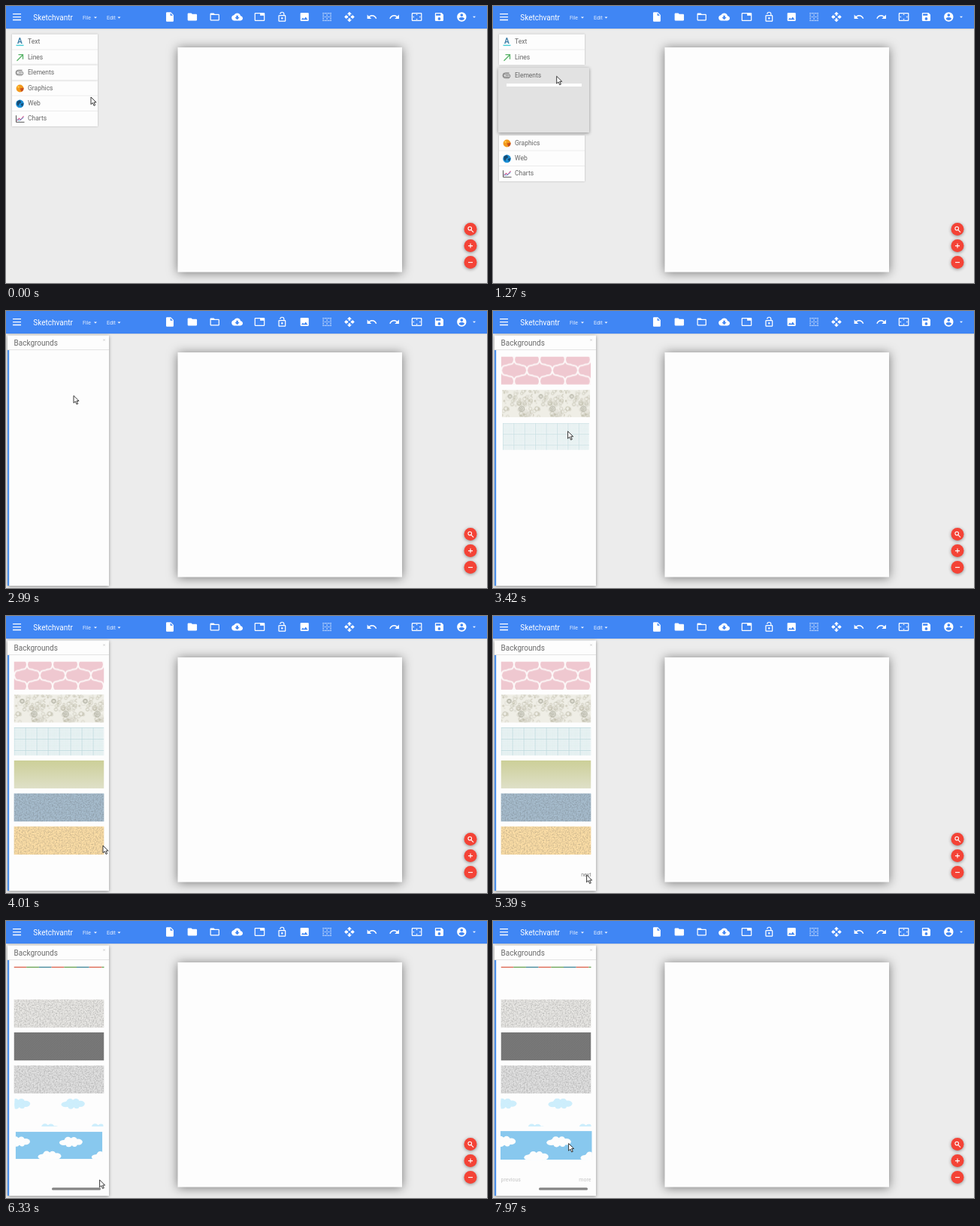
Recreate the animation shown at these times as an HTML page. Size 640 by 368 pixels, loop 8 s.

```html
<!DOCTYPE html>
<html lang="en">
<head>
<meta charset="utf-8">
<title>Backgrounds panel</title>
<style>
html, body { margin: 0; width: 100%; height: 100%; overflow: hidden; background: #ececec; }
svg { display: block; font-family: Roboto, Arial, sans-serif; }
#stage { width: 100vw; height: 100vh; }
.page { filter: drop-shadow(0 1px 7px rgba(0,0,0,.5)); }
.card { filter: drop-shadow(0 .6px .8px rgba(0,0,0,.25)); }
.lift { filter: drop-shadow(0 1px 2px rgba(0,0,0,.4)); }
.row { font-size: 8.5px; fill: #666; }
.foot { font-size: 7px; }
</style>
</head>
<body>
<svg id="stage" viewBox="0 0 640 368">
  <defs>
    <filter id="grain" x="0" y="0" width="1" height="1" color-interpolation-filters="sRGB">
      <feTurbulence type="fractalNoise" baseFrequency=".55" numOctaves="2" seed="4"/>
      <feColorMatrix values="0 0 0 0 .3  0 0 0 0 .3  0 0 0 0 .3  .6 0 0 0 -.22"/>
      <feComposite in2="SourceGraphic" operator="atop" result="n"/>
      <feMerge><feMergeNode in="SourceGraphic"/><feMergeNode in="n"/></feMerge>
    </filter>
    <linearGradient id="olive" x2="0" y2="1">
      <stop stop-color="#cccf98"/><stop offset="1" stop-color="#dfe0c8"/>
    </linearGradient>
    <pattern id="trellis" width="34" height="29" x="34.5" y="4" patternUnits="userSpaceOnUse">
      <rect width="34" height="29" fill="#efc8d0"/>
      <g id="quads" fill="none" stroke="#fdf8f8" stroke-width="2"></g>
    </pattern>
    <pattern id="floral" width="42" height="37.5" patternUnits="userSpaceOnUse">
      <rect width="42" height="37.5" fill="#efeee6"/>
      <g id="petals" fill="none"></g>
    </pattern>
    <pattern id="graph" width="15" height="15" patternUnits="userSpaceOnUse">
      <rect width="15" height="15" fill="#f4f9f9"/>
      <path id="fine" stroke="#d3e6e8" stroke-width=".6"/>
      <path d="M0 .4H15M.4 0V15" stroke="#b9d6da" stroke-width=".8"/>
    </pattern>
    <pattern id="twill" width="3" height="3" patternUnits="userSpaceOnUse">
      <rect width="3" height="3" fill="#797979"/>
      <path d="M0 3L3 0" stroke="#6d6d6d" stroke-width=".8"/>
    </pattern>
    <g id="cloud">
      <ellipse rx="12" ry="5"/><ellipse cx="-10" cy="1" rx="6" ry="3.6"/>
      <ellipse cx="10" rx="6" ry="4.2"/><circle cx="-4" cy="-2" r="5"/>
      <circle cx="4" cy="-2.3" r="4.6"/><circle cx="-3" cy="3" r="4"/><circle cx="5" cy="3" r="3.6"/>
    </g>
  </defs>

  <rect width="640" height="368" fill="#ececec"/>
  <rect class="page" x="228.5" y="55" width="298.5" height="298.5" fill="#fdfdfd"/>
  <rect class="card" width="640" height="30" fill="#4086f4"/>
  <path d="M9 10.7h11M9 14.6h11M9 18.5h11" stroke="#fff" stroke-width="1.3"/>
  <g fill="#fff">
    <text x="36.3" y="18.6" font-size="10">Sketchvantr</text>
    <g font-size="7" opacity=".85"><text x="102" y="17.8">File</text><text x="134" y="17.8">Edit</text></g>
    <path d="M117 14.6h4l-2 2zM148.5 14.6h4l-2 2zM621 13.8h4l-2 2z"/>
    <g id="tools"></g>
  </g>
  <g id="fabs"></g>

  <g id="menu">
    <g id="top" class="card"></g>
    <g id="bottom" class="card"></g>
    <g id="mid" class="card">
      <rect id="midBox" fill="#fdfdfd"/>
      <rect id="midTint" fill="#e2e2e2"/>
      <g id="midRow"></g>
      <svg id="list" x="18" y="103" width="100">
        <rect width="100" height="90" fill="#fdfdfd"/>
        <text class="row" x="11" y="13.5">Backgrounds</text>
      </svg>
    </g>
  </g>

  <g id="panel">
    <rect class="lift" x="2" y="32.5" width="135" height="332.5" fill="#fdfdfd"/>
    <path d="M2 51.5H137" stroke="#ddd" stroke-width=".8"/>
    <rect x="2" y="52" width="2.2" height="313" fill="#4a8fe8"/>
    <text x="10.5" y="45.8" font-size="10" fill="#6a6a6a">Backgrounds</text>
    <path d="M129.5 37.5l2 2m0-2l-2 2" stroke="#aaa" stroke-width=".6"/>
    <g id="page1"></g>
    <g id="page2"></g>
    <text id="next" class="foot" x="130.5" y="346" text-anchor="end" fill="#808080">next</text>
    <g id="pager" class="foot" fill="#c6c6c6">
      <text x="10.5" y="346">previous</text><text x="130.5" y="346" text-anchor="end">more</text>
    </g>
    <rect id="scroll" x="61" y="354.2" width="65" height="3.4" rx="1.5" fill="#858585"/>
  </g>
  <path id="cursor" d="M0 0V9.7L2.3 7.6 4 11.4 5.7 10.7 4 7H7.1Z" fill="#fff" stroke="#222" stroke-width=".9"/>
</svg>

<script>
const $ = id => document.getElementById(id);
const set = (id, attrs) => { for (const k in attrs) $(id).setAttribute(k, attrs[k]); };
const show = (id, on) => $(id).style.display = on ? '' : 'none';
const range = n => [...Array(n).keys()];
const clamp = v => Math.max(0, Math.min(1, v));
const smooth = v => v * v * (3 - 2 * v);

// Value of a keyframed track [[time, a, b...], ...] at time t
function track(keys, t) {
  const i = keys.findIndex(k => k[0] > t);
  if (i < 0) return keys[keys.length - 1].slice(1);
  if (!i) return keys[0].slice(1);
  const p = keys[i - 1], q = keys[i], e = smooth((t - p[0]) / (q[0] - p[0]));
  return p.slice(1).map((v, j) => v + (q[j + 1] - v) * e);
}

// Toolbar: x of the centre and a path on a 24 unit grid
const undo = 'M12.5 8c-2.65 0-5.05.99-6.9 2.6L2 7v9h9l-3.62-3.62c1.39-1.16 3.16-1.88 5.12-1.88 3.54 0 6.55 2.31 7.6 5.5l2.37-.78C21.08 11.03 17.15 8 12.5 8z';
const folder = 'M10 4H4c-1.1 0-2 .9-2 2v12c0 1.1.9 2 2 2h16c1.1 0 2-.9 2-2V8c0-1.1-.9-2-2-2h-8z';
const tools = [
  'M6 2C4.900 2 4 2.900 4 4v16c0 1.100.9 2 2 2h12c1.100 0 2-.9 2-2V8l-6-6zm7 7V3.500L18.500 9z',
  folder,
  folder + 'M20 18H4V8h16z',
  'M19.350 10.040C18.670 6.590 15.640 4 12 4 9.110 4 6.600 5.640 5.350 8.040 2.340 8.360 0 10.910 0 14c0 3.310 2.690 6 6 6h13c2.760 0 5-2.240 5-5 0-2.640-2.050-4.780-4.650-4.960zM17 13l-5 5-5-5h3V9h4v4z',
  'M21 3H3c-1.1 0-2 .9-2 2v14c0 1.1.9 2 2 2h18c1.1 0 2-.9 2-2V5c0-1.1-.9-2-2-2zm0 16H3V5h10v4h8z',
  'M12 17a2 2 0 1 0 0-4 2 2 0 1 0 0 4zm6-9h-1V6A5 5 0 0 0 7 6h1.9a3.1 3.1 0 0 1 6.2 0v2H6c-1.1 0-2 .9-2 2v10c0 1.1.9 2 2 2h12c1.1 0 2-.9 2-2V10c0-1.1-.9-2-2-2zm0 12H6V10h12z',
  'M21 19V5c0-1.1-.9-2-2-2H5c-1.1 0-2 .9-2 2v14c0 1.1.9 2 2 2h14c1.1 0 2-.9 2-2zM8.500 13.500l2.500 3 3.500-4.500 4.500 6H5z',
  '',
  'M10 9h4V6h3l-5-5-5 5h3zm-1 1H6V7l-5 5 5 5v-3h3zm14 2l-5-5v3h-3v4h3v3zm-9 3h-4v3H7l5 5 5-5h-3z',
  undo, undo,
  'M12 5.5L10 8h4zM18 10v4l2.5-2zM6 10l-2.500 2L6 14zm8 6h-4l2 2.500zm7-13H3c-1.100 0-2 .9-2 2v14c0 1.100.9 2 2 2h18c1.100 0 2-.9 2-2V5c0-1.100-.9-2-2-2zm0 16H3V5h18z',
  'M17 3H5c-1.100 0-2 .9-2 2v14c0 1.100.9 2 2 2h14c1.100 0 2-.9 2-2V7zm-5 16a3 3 0 1 1 0-6 3 3 0 1 1 0 6zm3-10H5V5h10z',
  'M12 2a10 10 0 1 0 0 20 10 10 0 1 0 0-20zm0 3a3 3 0 1 1 0 6 3 3 0 1 1 0-6zm0 14.200c-2.500 0-4.710-1.280-6-3.220.03-2 4-3.080 6-3.080s5.970 1.080 6 3.080c-1.290 1.940-3.500 3.220-6 3.220z'
];
$('tools').innerHTML = tools.map((d, i) =>
  `<g transform="translate(${218 + i * 29.87} 14.5) scale(${i == 10 ? -.62 : .62} .62) translate(-12 -12)">` +
  (d ? `<path fill-rule="evenodd" d="${d}"/>` :
    '<path d="M3 4h18M3 12h18M3 20h18M4 3v18M12 3v18M20 3v18" stroke="#fff" stroke-width="2" stroke-dasharray="2"/>') +
  '</g>').join('');

$('fabs').innerHTML = ['M1 1L4 4M1.500-1A2.300 2.300 0 1 1-3.100-1 2.300 2.300 0 1 1 1.500-1', 'M-3 0H3M0-3V3', 'M-3 0H3'].map((d, i) =>
  `<g transform="translate(618 ${296.6 + i * 22})"><circle class="lift" r="8.500" fill="#f44336"/>
   <path d="${d}" fill="none" stroke="#fff" stroke-width="1.100"/></g>`).join('');

// Side menu
const items = [
  ['Text', '<text x="-3.500" y="3" font-size="10" font-weight="700" fill="#3f7fa8">A</text><path d="M-5 5H5" stroke="#4fd0d8" stroke-width="1.500"/>'],
  ['Lines', '<path d="M-4 5L3.500-2.500M-2-3H4V3" fill="none" stroke="#58b368" stroke-width="1.300"/>'],
  ['Elements', '<path d="M3 2.500H-2.500a2 2 0 0 1 0-4H2.500a3 3 0 0 1 0 5.500H-2a3.500 3.500 0 0 1 0-7H3M-2 .5H3" fill="none" stroke="#666" stroke-width=".8"/>'],
  ['Graphics', '<circle cy="1" r="4.900" fill="#f39a1e"/><path d="M0 1L5 0A5 5 0 0 1 2 5.500Z" fill="#c8501c"/><circle cx="-2" cy="-1" r="1.200" fill="#ffd04a"/>'],
  ['Web', '<circle cy="1" r="5.300" fill="#1c8fd6"/><path d="M-4-2L0-4 2-1-1 1-2 4-4 2ZM1 1L5 0 3 5Z" fill="#174a70"/>'],
  ['Charts', '<path d="M-5-4V5H6" fill="none" stroke="#555"/><path d="M-4 3L-1 0 1 2 5-3" fill="none" stroke="#d0508a" stroke-width="1.100"/><path d="M-4 1L-1 3 5-1" fill="none" stroke="#4a9fd8" stroke-width=".8"/>']
];
const pitch = 20.4;
const row = i => {
  const y = 47.3 + i * pitch;
  return `<g transform="translate(18.500 ${y})">${items[i][1]}</g><text class="row" x="29" y="${y + 3}">${items[i][0]}</text>`;
};
const card = (first, n) => {
  const y = 37.5 + first * pitch;
  return `<rect x="8" y="${y}" width="114" height="${n * pitch}" fill="#fdfdfd"/>` + range(n).map(k =>
    (k ? `<path d="M8 ${y + k * pitch}h114" stroke="#e9e9e9" stroke-width=".8"/>` : '') + row(first + k)).join('');
};
$('top').innerHTML = card(0, 2);
$('bottom').innerHTML = card(3, 3);
$('midRow').innerHTML = row(2);

// Texture parts
$('quads').innerHTML = [[1, 1], [-1, 1], [1, -1], [-1, -1]].map(([a, b]) =>
  `<path transform="translate(17 14.500) scale(${a} ${b}) translate(-17 -14.500)" d="M0 14.500C1 6 6 9 8.500 7.250S16 8.500 17 0"/>`).join('');
let seed = 7;
const rnd = () => (seed = seed * 16807 % 2147483647) / 2147483647;
$('petals').innerHTML = range(70).map(() =>
  `<circle cx="${rnd() * 42}" cy="${rnd() * 37.5}" r="${.6 + rnd() * 2.4}" stroke="hsl(52 14% ${66 + rnd() * 18}%)" stroke-width=".8"/>`).join('') +
  '<g stroke="#a5a595"><circle cx="27" cy="26" r="3.600"/><circle cx="27" cy="26" r="1.500"/><circle cx="11" cy="9" r="2.500"/></g>';
set('fine', { d: range(7).map(i => `M0 ${i * 2.14}H15M${i * 2.14} 0V15`).join('') });

// Thumbnails
const fill = (c, grain) => `<rect width="120" height="37.500" fill="${c}"${grain ? ' filter="url(#grain)"' : ''}/>`;
const clouds = (c, list) => list.map(([x, y]) => `<use href="#cloud" x="${x}" y="${y}" fill="${c}"/>`).join('');
const stripes = range(8).map(i =>
  `<rect x="${i * 16.7}" width="16.700" height="1.700" fill="${['#dd6a55', '#6fa65a', '#4a8c9c'][i % 3]}"/>`).join('');
const pages = {
  page1: [fill('url(#trellis)'), fill('url(#floral)'), fill('url(#graph)'), fill('url(#olive)'),
    fill('#a6bccd', 1), fill('#fcdea6', 1)],
  page2: [stripes, fill('#e8e7e4', 1), fill('url(#twill)'), fill('#e0e0e0', 1),
    clouds('#cdeefc', [[5, 7], [79, 7], [45, 41], [113, 41]]),
    fill('#88c8ee') + clouds('#fdfdfd', [[4, 13.5], [76.5, 14], [47, 33.5], [121, 34]])]
};
const top0 = i => 60.4 + i * 43.8;
for (const id in pages) $(id).innerHTML = pages[id].map((art, i) =>
  `<g><svg x="10.500" y="${top0(i)}" width="120" height="37.500">${art}</svg></g>`).join('');

// Thumbnails appear one after another, growing slightly
function load(id, t, start, gap) {
  [...$(id).children].forEach((g, i) => {
    const p = clamp((t - start - i * gap) / 300), s = .95 + .05 * p, cy = top0(i) + 18.75;
    g.setAttribute('opacity', clamp(p * 4));
    g.setAttribute('transform', `translate(70.500 ${cy}) scale(${s}) translate(-70.500 ${-cy})`);
  });
}

const cursor = [[0, 113, 121], [90, 113, 121], [200, 84.7, 93.3], [1450, 84.7, 93.3], [1890, 86, 112],
  [2000, 86, 112], [2050, 90, 127], [2380, 90, 127], [2660, 90, 112.5], [3140, 90, 112.5], [4010, 129, 305],
  [4160, 129, 305], [4470, 143, 338], [4870, 143, 338], [5150, 124.6, 344], [7180, 124.6, 344], [7610, 100.6, 295.5]];
const menu = [[900, 0, 0, 0], [1200, 73, 1, 4], [1420, 73, 1, 4], [1890, 93, 1, 78]];

function draw(t) {
  const open = t >= 2990;
  show('menu', !open);
  show('panel', open);
  if (!open) {
    const [shift, p, list] = track(menu, t);
    const y = 78.3 + 3.7 * p;
    const box = { x: 8 - p, y, width: 114 + 7 * p, height: 98.7 - 3.7 * p + shift - y };
    set('midBox', box);
    set('midTint', { ...box, opacity: p });
    set('mid', { class: p > 0 ? 'lift' : 'card' });
    set('midRow', { transform: `translate(0 ${3.7 * p})` });
    set('bottom', { transform: `translate(0 ${shift})` });
    set('list', { height: list });
    show('list', list > 0);
  } else {
    const second = t >= 5620;
    show('page1', !second);
    show('page2', second);
    show('next', t >= 4160 && !second);
    show('scroll', t >= 5900);
    set('pager', { opacity: clamp((t - 6480) / 450) });
    load(second ? 'page2' : 'page1', t, second ? 5700 : 3140, 110);
    if (t >= 7970) $('page2').lastChild.setAttribute('transform', 'translate(70.8 298.2) scale(1.015) translate(-70.5 -298.2)');
  }
  set('cursor', { transform: `translate(${track(cursor, t)})` });
  requestAnimationFrame(tick);
}
const tick = () => draw(performance.now() % 8000);
tick();
</script>
</body>
</html>
```
